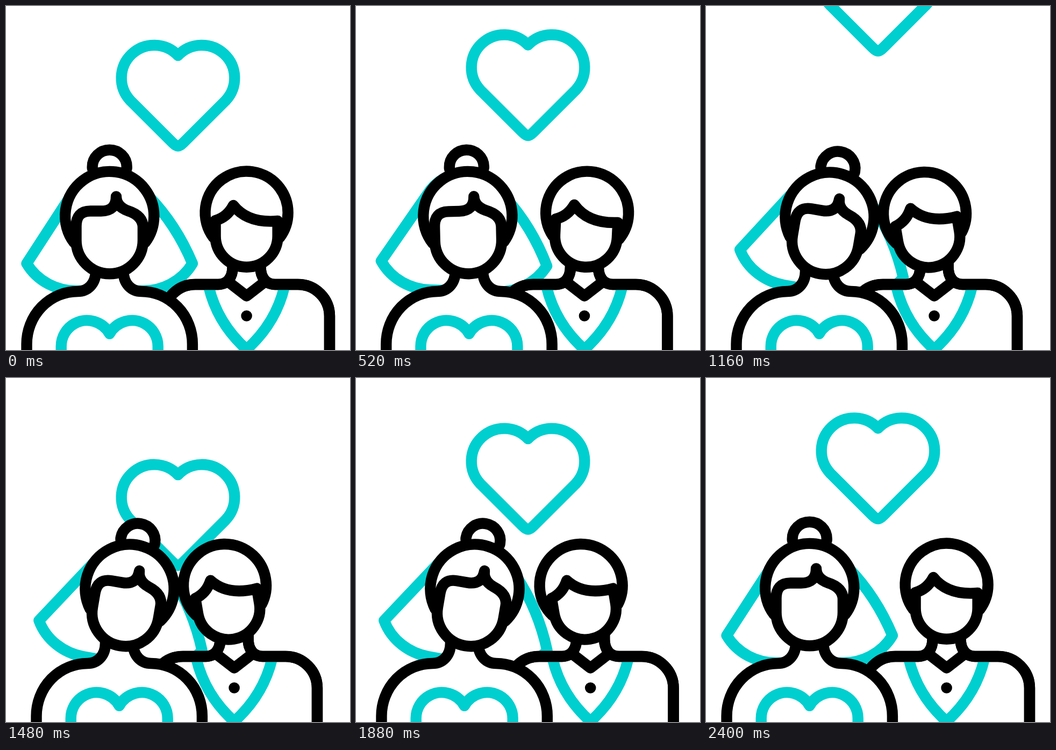
Animation of 640 by 640 pixels, one loop 2440 ms. Source, as an HTML page with a canvas:

```html
<!DOCTYPE html>
<html lang="en">
<head>
<meta charset="utf-8">
<title>Newlyweds</title>
<style>
  html, body { margin: 0; width: 100%; height: 100%; overflow: hidden; background: #fff; }
  canvas { display: block; width: 100vw; height: 100vh; }
</style>
</head>
<body>
<canvas width="640" height="640"></canvas>
<script>
  const ctx = document.querySelector("canvas").getContext("2d");
  const LOOP = 2440;
  const DRIFT = 0.0375;
  const BLACK = "#000";
  const TEAL = "#00cfcf";
  const DEG = Math.PI / 180;

  // Shapes are drawn around x = 0, the axis of each figure.
  function mirrored(half) {
    const whole = new Path2D(half);
    whole.addPath(half, new DOMMatrix([-1, 0, 0, 1, 0, 0]));
    return whole;
  }

  function arc(x, y, r, from, to) {
    const path = new Path2D();
    path.arc(x, y, r, from, to);
    return path;
  }

  // Right half of a heart: a round lobe from the cusp, then the rest of the outline.
  function heartShape(x, y, r, end, rest) {
    const half = arc(x, y, r, -Math.acos(-x / r), end);
    rest(half);
    return mirrored(half);
  }

  const hair = (y, r) => arc(0, y, r, 143 * DEG, 37 * DEG);

  const heart = heartShape(44.3, 134, 61, 45 * DEG, half => {
    half.lineTo(10, 254.4);
    half.quadraticCurveTo(3.7, 260.7, 0, 260.7);
  });
  const dressHeart = heartShape(42, 633, 48, 0, half => half.lineTo(90, 660));

  const veil = new Path2D("M-154.2 479L-73 354A83.2 83.2 0 0 1 73 354Q124 407 154.2 479C134 513 97 530 62 530H-62C-97 530-134 513-154.2 479Z");
  const brideBody = mirrored(new Path2D("M0 476H25.8V494C25.8 517 41 531 59 531A95.2 98 0 0 1 154.2 629V660H0"));
  const bun = new Path2D("M-32 302V299A32 31.3 0 0 1 32 299V302");
  const brideFace = new Path2D("M-62.2 410Q-62.2 381.5-35.7 381.5H-15.7Q12.3 381.5 12.3 354.5Q12.3 373 34 381Q62.2 390 62.2 412V436A62.2 62.2 0 0 1-62.2 436Z");

  const groomBody = mirrored(new Path2D("M0 466H26V486C26 505 36 518 53 518H95.4A59 59 0 0 1 154.4 577V660H0"));
  const vest = mirrored(new Path2D("M70.5 522Q54.5 590 0 639"));
  const collar = mirrored(new Path2D("M0 539.5L35.5 512"));
  const groomFace = new Path2D("M-58 399Q-36 393-24.6 371Q2.4 405 58 400V428A58 57.7 0 0 1-58 428Z");

  function paint(path, color = BLACK, filled = true) {
    ctx.fillStyle = "#fff";
    if (filled) ctx.fill(path);
    ctx.strokeStyle = color;
    ctx.stroke(path);
  }

  function at(x, y, drawParts) {
    ctx.save();
    ctx.translate(x, y);
    drawParts();
    ctx.restore();
  }

  function turned(degrees, pivotY, drawParts) {
    at(0, pivotY, () => {
      ctx.rotate(degrees * DEG);
      at(0, -pivotY, drawParts);
    });
  }

  function ease(t, from, to) {
    const u = Math.min(1, Math.max(0, (t - from) / (to - from)));
    return u * u * (3 - 2 * u);
  }

  // Bodies step together and apart again; 1 is closest.
  const closeness = t => ease(t, 40, 560) - ease(t, 1680, 2080);

  // Heads trail behind the step, then lean in until the couple parts.
  function tilt(t, trail, lean, settled) {
    const leanIn = ease(t, 550, settled);
    return trail * (ease(t, 0, 550) - leanIn) + lean * (leanIn - ease(t, 1880, 2230));
  }

  function veilSwing(t) {
    return 3 * (ease(t, 0, 250) - ease(t, 800, 1160)) + 0.7 * (ease(t, 1160, 1480) - ease(t, 1880, 2230));
  }

  // The heart drifts up, speeds off the top and rises again behind the couple.
  function heartY(t) {
    if (t < LOOP / 2 + 20) return -DRIFT * t - 0.00169 * Math.max(0, t - 880) ** 2;
    return DRIFT * (LOOP - t) + 0.00368 * Math.max(0, 1600 - t) ** 2;
  }

  function drawGroom(headTilt) {
    paint(groomBody);
    paint(vest, TEAL, false);
    paint(groomBody, BLACK, false);
    paint(collar, BLACK, false);
    ctx.fillStyle = BLACK;
    ctx.fill(arc(0, 576.5, 10.3, 0, 2 * Math.PI));
    turned(headTilt, 490, () => {
      paint(hair(384.5, 77));
      paint(groomFace);
    });
  }

  function drawBride(headTilt) {
    paint(brideBody);
    paint(dressHeart, TEAL, false);
    turned(headTilt, 505, () => {
      paint(bun);
      paint(hair(390.5, 82.6));
      paint(brideFace);
    });
  }

  function draw(t) {
    const brideX = 192.7 + 18 * closeness(t);
    const groomX = 447.6 - 23 * closeness(t);
    const brideTilt = tilt(t, -1.3, 9.7, 1050);
    const groomTilt = tilt(t, 2.8, -9.6, 990);

    ctx.clearRect(0, 0, 640, 640);
    ctx.lineWidth = 20.4;
    ctx.lineCap = ctx.lineJoin = "round";
    at(320, heartY(t), () => paint(heart, TEAL));
    at(brideX, 0, () => turned(brideTilt, 505, () => turned(veilSwing(t), 310, () => paint(veil, TEAL))));
    at(groomX, 0, () => drawGroom(groomTilt));
    at(brideX, 0, () => drawBride(brideTilt));
  }

  const start = performance.now();
  function loop() {
    draw((performance.now() - start) % LOOP);
    requestAnimationFrame(loop);
  }
  loop();
</script>
</body>
</html>
```
